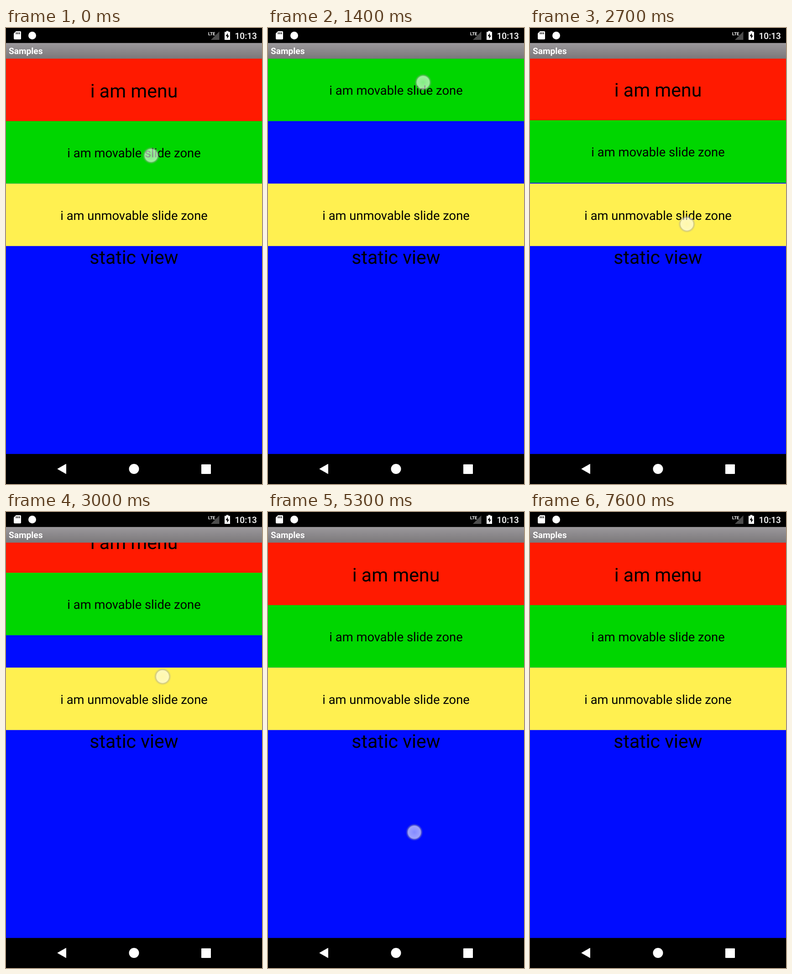
Recreate the animation shown at these times as an HTML page. Size 561 by 998 pixels, loop 8 s.

```html
<!DOCTYPE html>
<html lang="en">
<head>
<meta charset="utf-8">
<title>Slide zones</title>
<style>
  html, body { margin: 0; height: 100%; overflow: hidden; background: #000; }
  svg { display: block; width: 100vw; height: 100vh; font-family: Roboto, sans-serif; text-rendering: geometricPrecision; }
  .mid { text-anchor: middle; }
  .big { font-size: 41px; }
  .zone { font-size: 27.35px; }
</style>
</head>
<body>
<svg viewBox="0 0 561 998">
  <defs>
    <linearGradient id="bar" x2="0" y2="1">
      <stop stop-color="#9b989c"/>
      <stop offset="1" stop-color="#7b787a"/>
    </linearGradient>
    <radialGradient id="dot">
      <stop stop-color="#fff" stop-opacity=".52"/>
      <stop offset=".7" stop-color="#fff" stop-opacity=".62"/>
      <stop offset=".78" stop-color="#b4b4b4" stop-opacity=".62"/>
      <stop offset=".86" stop-color="#a0a0a0" stop-opacity=".3"/>
      <stop offset="1" stop-color="#a0a0a0" stop-opacity="0"/>
    </radialGradient>
  </defs>

  <rect y="67" width="561" height="865.5" fill="#000cff"/>
  <text class="mid big" x="280.5" y="516">static view</text>

  <g id="menu">
    <rect y="67" width="561" height="137" fill="#ff1a00"/>
    <text class="mid big" x="280.5" y="151.5">i am menu</text>
    <rect y="203.8" width="561" height="136.7" fill="#00d600"/>
    <text class="mid zone" x="280.5" y="282.8">i am movable slide zone</text>
  </g>

  <rect y="340.5" width="561" height="136.7" fill="#fff050"/>
  <text class="mid zone" x="280.5" y="419.5">i am unmovable slide zone</text>

  <circle id="touch" r="19" fill="url(#dot)"/>

  <!-- status and title bars -->
  <rect width="561" height="33"/>
  <rect y="32.8" width="561" height="34.3" fill="url(#bar)"/>
  <text x="6" y="56.5" font-size="19.1" font-weight="700" fill="#fff">Samples</text>
  <g fill="#fff">
    <path d="M22 7h9q2 0 2 2v14q0 2-2 2H19q-2 0-2-2V12z"/>
    <path d="M22.5 9.5v4M26 9.5v4M29.5 9.5v4" stroke="#000" stroke-width="1.7"/>
    <circle cx="57.5" cy="16.5" r="8.5"/>
    <path d="M449 26L467.5 7.5V26z" fill="#4d4d4d"/>
    <text x="443" y="15.5" font-size="9.5" font-weight="600" font-stretch="75%">LTE</text>
    <path d="M482.5 8.5V6.5h5v2H491V26H479V8.5z"/>
    <path d="M486 11l-4.5 7h3v5.5l4.500-7h-3z" fill="#000"/>
    <text x="501.500" y="24" font-size="19.1" font-weight="500">10:13</text>
  </g>

  <!-- navigation bar -->
  <rect y="932.5" width="561" height="65.5"/>
  <g fill="#fff">
    <path d="M113 965L131.5 954.5V975.5z" stroke="#fff" stroke-linejoin="round"/>
    <circle cx="280.5" cy="965" r="11"/>
    <rect x="428" y="955" width="21" height="21" rx="1"/>
  </g>
</svg>
<script>
const LOOP = 8000, STEP = 100;
const CLOSED = -136.7, STATIC_TOP = 477, SLOP = 16, SETTLE = 150;
const menu = document.getElementById("menu");
const touch = document.getElementById("touch");

const swipe = (start, length, from, to) => ({ start, length, from, to });
const swipes = [
  swipe(0, 650, [318, 279], [317, 162]),
  swipe(1400, 650, [340, 119], [340, 234]),
  swipe(2640, 510, [344, 447], [343, 350]),
  swipe(4000, 550, [335, 398], [337, 483]),
  swipe(5000, 650, [322, 799], [320, 651]),
  swipe(6000, 650, [331, 634], [341, 801]),
  swipe(6900, 650, [325, 830], [316, 715])
];

const clamp = (v, lo, hi) => Math.min(hi, Math.max(lo, v));
const mix = (a, b, p) => a + (b - a) * p;

function finger(s, t) {
  const p = Math.sin(clamp((t - s.start) / s.length, 0, 1) * Math.PI / 2);
  return s.from.map((v, i) => mix(v, s.to[i], p));
}

// The menu follows the finger past the slop, then settles open or closed.
function menuOffset(t) {
  let offset = 0;
  for (const s of swipes) {
    if (t < s.start || s.from[1] > STATIC_TOP) break;
    const travel = finger(s, t)[1] - s.from[1];
    const drag = Math.sign(travel) * Math.max(Math.abs(travel) - SLOP, 0);
    const rest = s.to[1] < s.from[1] ? CLOSED : 0;
    const settled = clamp((t - s.start - s.length) / SETTLE, 0, 1);
    offset = mix(clamp(offset + drag, CLOSED, 0), rest, settled);
  }
  return offset;
}

function draw(now) {
  const t = Math.floor(now % LOOP / STEP) * STEP;
  menu.setAttribute("transform", `translate(0 ${menuOffset(t)})`);
  const s = swipes.find(s => t >= s.start && t <= s.start + s.length);
  touch.style.display = s ? "" : "none";
  if (s) {
    const [x, y] = finger(s, t);
    touch.setAttribute("cx", x);
    touch.setAttribute("cy", y);
  }
}

let start;
function tick(now) {
  start ??= now;
  draw(now - start);
  requestAnimationFrame(tick);
}
draw(0);
requestAnimationFrame(tick);
</script>
</body>
</html>
```
